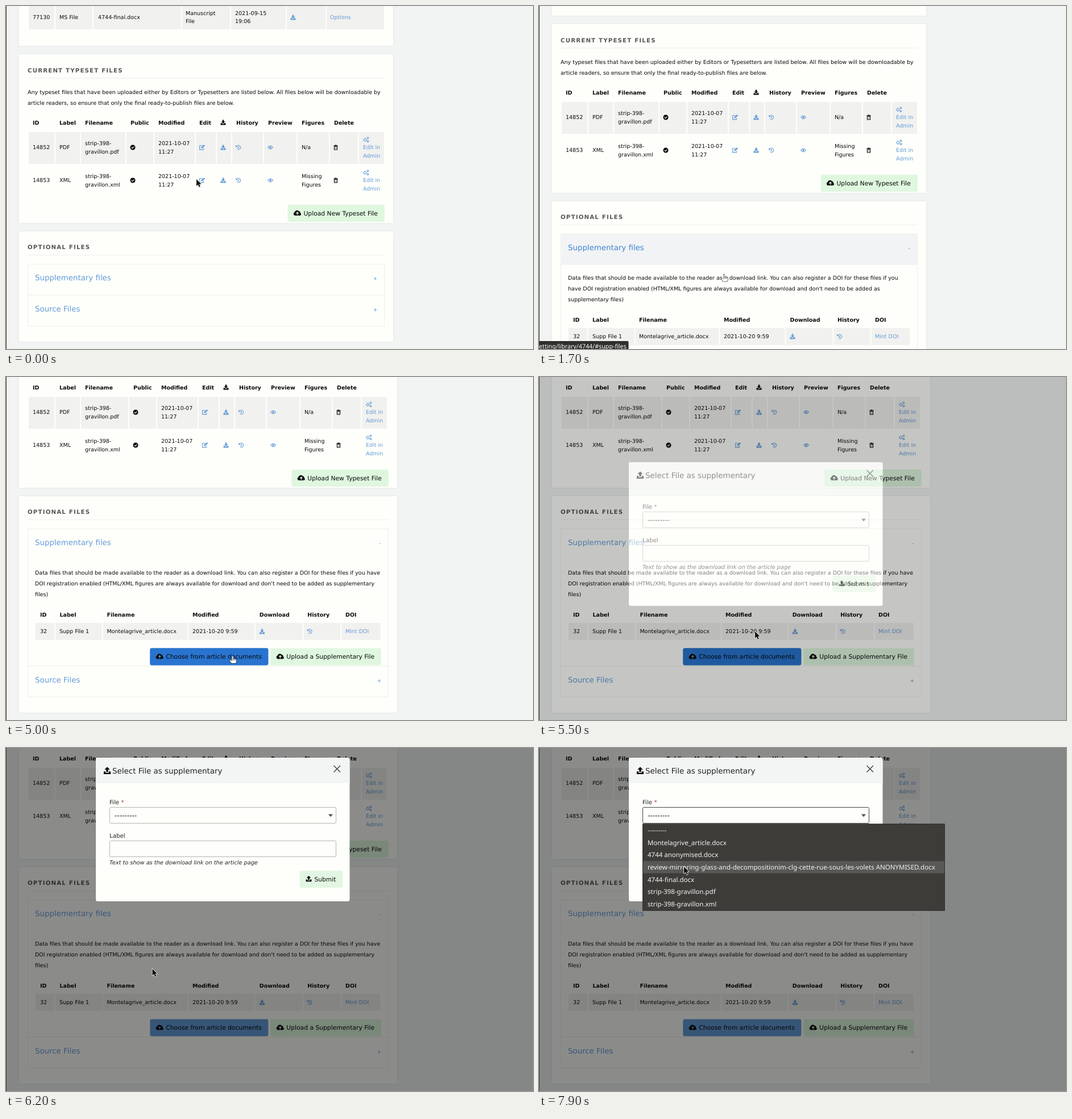
These frames come from a looping animation (927 px wide and 604 px high, 8 s). An HTML page with a canvas:

```html
<!DOCTYPE html>
<html lang="en">
<head>
<meta charset="utf-8">
<title>Typeset files</title>
<style>
html, body { margin: 0; width: 100%; height: 100%; overflow: hidden; background: #f2f4f4; }
canvas { display: block; }
</style>
</head>
<body>
<canvas id="stage" width="927" height="604"></canvas>
<script>
const stage = document.getElementById('stage'), layer = stage.cloneNode();
const LINK = '#649bd8', INK = '#0a0a0a', PAPER = '#fefffb', CELL = '#f1f1ef', MINT = '#dff7df', RULE = '#eeeeeb';
const SANS = '"DejaVu Sans", sans-serif', MENU = '"Noto Sans", sans-serif';
let ctx = stage.getContext('2d'), t = 0, wide = false;

const ramp = (a, b) => Math.min(1, Math.max(0, (t - a) / (b - a)));
const swing = (a, b) => 0.5 - Math.cos(Math.PI * ramp(a, b)) / 2;

function rect(x, y, w, h, color, r = 0) {
  ctx.fillStyle = color;
  ctx.beginPath();
  ctx.roundRect(x, y, w, h, r);
  ctx.fill();
}
function frame(x, y, w, h, color, r = 0) {
  ctx.strokeStyle = color;
  ctx.lineWidth = 1;
  ctx.beginPath();
  ctx.roundRect(x + .5, y + .5, w - 1, h - 1, r);
  ctx.stroke();
}
// y is the middle of the capitals
function text(str, x, y, { size = 9.5, color = INK, style = '', family = SANS, spacing = 0 } = {}) {
  ctx.textRendering = 'geometricPrecision';
  ctx.font = `${style} ${size}px ${family}`;
  ctx.letterSpacing = spacing + 'px';
  ctx.fillStyle = color;
  ctx.fillText(str, x, y + size * .36);
}
const bold = (str, x, y) => text(str, x, y, { style: 'bold' });
const link = (str, x, y) => text(str, x, y, { color: LINK });

// fill, stroke, cut-out stroke
const ICONS = {
  download: ['M-1.3-4.5h2.6v3h2.2L0 2-3.5-1.5h2.2zM-4.5 1.2H-2l2 2 2-2h2.5v3.2h-9z'],
  upload: ['M0-5 3.5-1.5H1.3v3H-1.3v-3H-3.5zM-4.5 1h2.3v1.6h4.4V1h2.3v3.4h-9z'],
  edit: ['M-2 1.6l.4-2.2L3.4-4.7 5.2-2.9.2 1.3z', 'M2.4 1v2.9h-6.8v-7.2H1'],
  history: ['M-4.8-4.2v3.4h3.4z', 'M-3.4-1.6A3.7 3.7 0 1 1-2.6 2.7M.2-2V.6H-1.6'],
  eye: ['M1.7 0A1.7 1.7 0 1 1-1.7 0 1.7 1.7 0 1 1 1.7 0z', 'M-4.5 0Q0-5.6 4.5 0 0 5.6-4.5 0z'],
  check: ['M4.5 0A4.5 4.5 0 1 1-4.5 0 4.5 4.5 0 1 1 4.5 0z', '', 'M-2.2 0-.6 1.7 2.4-1.4'],
  trash: ['M-3.8-3.6h2.2l.5-1h2.2l.5 1h2.2v1h-7.6zM-3.1-2.2h6.2v6.6h-6.2z', '', 'M-1.4-1.2v4.6M0-1.2v4.6M1.4-1.2v4.6'],
  cogs: ['', 'M.3.6A2.3 2.3 0 1 1-4.3.6 2.3 2.3 0 1 1 .3.6M-2-2.6v1M-2 2.8v1M-5.2.6h1M.2.6h1M4.3-2.7A1.3 1.3 0 1 1 1.7-2.7 1.3 1.3 0 1 1 4.3-2.7M4.3 3.2A1.3 1.3 0 1 1 1.7 3.2 1.3 1.3 0 1 1 4.3 3.2'],
  cloud: ['M-3.3 4a2.7 2.7 0 0 1-.8-5.2A3.6 3.6 0 0 1 2.3-2.6 2.6 2.6 0 0 1 4.6.2 2 2 0 0 1 3.8 4z', '', 'M0 3V-1M-1.9.8 0-1.1 1.9.8']
};
function icon(name, x, y, color = LINK, cut = PAPER, scale = 1) {
  const [fill, stroke, hole] = ICONS[name];
  ctx.save();
  ctx.translate(x, y);
  ctx.scale(scale, scale);
  ctx.fillStyle = ctx.strokeStyle = color;
  ctx.lineWidth = 1.1;
  ctx.fill(new Path2D(fill));
  if (stroke) ctx.stroke(new Path2D(stroke));
  if (hole) {
    ctx.strokeStyle = cut;
    ctx.stroke(new Path2D(hole));
  }
  ctx.restore();
}

function cells(edges, y, h) {
  for (let i = 1; i < edges.length; i++)
    rect(edges[i - 1] + 1, y, edges[i] - edges[i - 1] - 2, h, CELL);
}
function card(y, h) {
  ctx.shadowColor = 'rgba(0,0,0,.06)';
  ctx.shadowBlur = 4;
  rect(23, y, wide ? 665 : 658, h, PAPER);
  ctx.shadowColor = 'transparent';
}
function heading(str, y) {
  text(str, 38, y, { size: 10.2, style: 'bold', color: '#555', spacing: 1.2 });
  rect(38, y + 13.5, wide ? 635 : 628, 1, RULE);
}
function button(label, x, y, w, color, hoverColor, hover) {
  rect(x, y, w, 30, color, 3);
  ctx.globalAlpha = hover;
  rect(x, y, w, 30, hoverColor, 3);
  ctx.globalAlpha = 1;
  icon('cloud', x + 17, y + 14.5, INK, color, 1.15);
  text(label, x + 28, y + 15, { size: 10.75 });
}

function manuscriptRow() {
  card(-40, 110);
  cells([39, 86, 153, 309, 395, 493, 563, 666], -10, 51);
  text('77130', 47, 20);
  text('MS File', 94, 20);
  text('4744-final.docx', 162, 20);
  text('Manuscript', 316, 12.5);
  text('File', 316, 27);
  text('2021-09-15', 403, 12.5);
  text('19:06', 403, 27);
  icon('download', 505, 20);
  link('Options', 570, 20);
}

function typesetFiles() {
  const shift = x => x + (wide && x > 132 ? 5 : 0);
  card(85, 297);
  heading('CURRENT TYPESET FILES', 113);
  text('Any typeset files that have been uploaded either by Editors or Typesetters are listed below. All files below will be downloadable by', 38, 151.5);
  text('article readers, so ensure that only the final ready-to-publish files are below.', 38, 170.5);
  const heads = { ID: 47, Label: 94, Filename: 139, Public: 219, Modified: 268, Edit: 340, History: 405, Preview: 461, Figures: 520, Delete: 577 };
  for (const name in heads) bold(name, wide && name === 'Filename' ? 139 : shift(heads[name]), 205.5);
  icon('download', shift(382), 205, INK);
  cells([39, 86, 131, 211, 260, 333, 370, 397, 453, 512, 569, 620, 666].map(shift), 222, 56);
  [['14852', 'PDF', ['N/a']], ['14853', 'XML', ['Missing', 'Figures']]].forEach(([id, kind, figures], i) => {
    const y = 249 + 58 * i;
    text(id, 47, y);
    text(kind, 94, y);
    text('strip-398-', 139, y - 7);
    text('gravillon.' + kind.toLowerCase(), 139, y + 7.5);
    text('2021-10-07', shift(268), y - 7);
    text('11:27', shift(268), y + 7.5);
    icon('check', shift(223), y, INK);
    icon('edit', shift(345), y);
    icon('download', shift(382), y);
    icon('history', shift(409), y);
    icon('eye', shift(465), y);
    figures.forEach((line, n) => text(line, shift(520), y + (figures[1] ? -7 + 14.5 * n : 0)));
    icon('trash', shift(580), y, INK);
    icon('cogs', shift(633.5), y - 14);
    link('Edit in', shift(628), y);
    link('Admin', shift(628), y + 14.5);
  });
  button('Upload New Typeset File', wide ? 502.3 : 495.5, 350, 170.5, MINT, MINT, 0);
}

function supplementary(open) {
  const spread = x => wide ? x + (x - 52) * .0112 : x;
  const lines = wide
    ? ['Data files that should be made available to the reader as a download link. You can also register a DOI for these files if you have',
       "DOI registration enabled (HTML/XML figures are always available for download and don't need to be added as supplementary", 'files)']
    : ['Data files that should be made available to the reader as a download link. You can also register a DOI for these files if you',
       "have DOI registration enabled (HTML/XML figures are always available for download and don't need to be added as", 'supplementary files)'];
  const gap = wide ? 6.3 : 0;
  ctx.save();
  ctx.beginPath();
  ctx.rect(38, 509, 640, open);
  ctx.clip();
  lines.forEach((line, i) => text(line, 51, 531.5 + 19.2 * i));
  const heads = { ID: 60, Label: 94, Filename: 176, Modified: 325, Download: 441.5, History: 525, DOI: 591 };
  for (const name in heads) bold(name, spread(heads[name]), 605.5);
  cells([51, 85.5, 168.5, 317.5, 433.5, 517.5, 583.5, 653].map(spread), 620, 30);
  text('32', 60, 635);
  text('Supp File 1', 94, 635);
  text('Montelagrive_article.docx', spread(176), 635);
  text('2021-10-20 9:59', spread(325), 635);
  icon('download', spread(446), 635);
  icon('history', spread(529), 635);
  link('Mint DOI', spread(591), 635);
  const chosen = ramp(2500, 2900) - ramp(3400, 3700) + ramp(3700, 4000) - ramp(5700, 6100);
  button('Choose from article documents', 247 + gap, 664.5, 208, LINK, '#2874cf', chosen);
  button('Upload a Supplementary File', 459 + gap, 664.5, 194.5, MINT, '#b5e5b5', ramp(3400, 3700) - ramp(3700, 4000));
  ctx.restore();
}

function optionalFiles() {
  const open = 187 * swing(1100, 1400), w = wide ? 635 : 628, right = wide ? 7 : 0;
  const hot = t >= 800 && !wide, accent = hot ? '#3f86d3' : LINK;
  card(397, 194 + open);
  heading('OPTIONAL FILES', 424.5);
  if (hot) rect(38, 454, w, 55, '#f2f3f4');
  frame(38, 454, w, 110 + open, RULE);
  text('Supplementary files', 51, 478, { size: 13.35, color: accent });
  text(open ? '-' : '+', (open ? 649.5 : 645.5) + right, 480, { color: accent });
  if (open) supplementary(open);
  rect(38, 508.5 + open, w, 1, RULE);
  text('Source Files', 51, 533.5 + open, { size: 13.35, color: LINK });
  text('+', 645.5 + right, 535 + open, { color: LINK });
}

function dialog() {
  rect(158, 0, 446.5, 253, PAPER, 3);
  rect(158, 0, 446.5, 45, '#f3f4f4', [3, 3, 0, 0]);
  icon('upload', 178, 23, INK, PAPER, 1.35);
  text('Select File as supplementary', 187, 23, { size: 13.45, color: '#222' });
  ctx.strokeStyle = '#444';
  ctx.lineWidth = 1.5;
  ctx.stroke(new Path2D('M576.5 14l11.5 11.5M588 14l-11.5 11.5'));
  text('File', 182, 78, { size: 10.2, color: '#222' });
  text('*', 202.5, 78, { size: 10.2, color: '#b03020' });
  frame(182, 87, 399, 29, t >= 6500 ? '#444' : '#b4b4b2', 2);
  text('---------', 191, 102, { size: 12 });
  ctx.fillStyle = '#555';
  ctx.fill(new Path2D('M567 99.5h8l-4 5z'));
  text('Label', 182, 137, { size: 10.2, color: '#222' });
  frame(182, 146, 399, 29, '#b4b4b2', 2);
  text('Text to show as the download link on the article page', 182, 184, { size: 9.75, style: 'italic', color: '#222' });
  rect(516.5, 199, 76, 30, '#e3f6e3', 3);
  icon('upload', 532.5, 213.5, INK, PAPER, 1.1);
  text('Submit', 542.5, 214, { size: 10.7 });
}

// the backdrop and the dialog fade in together as one layer
function modal() {
  const shown = swing(4980, 6030), page = ctx;
  ctx = layer.getContext('2d');
  ctx.clearRect(0, 0, 927, 604);
  rect(0, 0, 927, 604, 'rgba(0,0,0,.45)');
  ctx.save();
  ctx.translate(0, Math.round(17 + 262 * (1 - shown)));
  dialog();
  ctx.restore();
  ctx = page;
  ctx.globalAlpha = shown;
  ctx.drawImage(layer, 0, 0);
  ctx.globalAlpha = 1;
}

function menu(pointerY) {
  const items = ['---------', 'Montelagrive_article.docx', '4744 anonymised.docx',
    'review-mirroring-glass-and-decompositionim-clg-cette-rue-sous-les-volets ANONYMISED.docx',
    '4744-final.docx', 'strip-398-gravillon.pdf', 'strip-398-gravillon.xml'];
  rect(182, 133.5, 532, 153, '#3d3c39');
  frame(182, 133.5, 532, 153, '#2c2b29');
  const active = Math.floor((pointerY + 1 - 134.4) / 21.6);
  items.forEach((item, i) => {
    const y = 145 + 21.6 * i;
    if (i === active) rect(183, y - 10.8, 530, 21.6, '#585856');
    text(item, 191, y, { size: 11.5, family: MENU, color: '#f4f4f2' });
  });
}

function statusBubble() {
  if (t < 800 || t >= 2400) return;
  ctx.globalAlpha = 1 - ramp(2100, 2400);
  rect(-2, 590, 159.5, 16, '#2f2f2e', 2);
  text('etting/library/4744/#supp-files', 0, 599, { size: 10.7, family: MENU, color: '#fff' });
  ctx.globalAlpha = 1;
}

const ARROW = new Path2D('M0 0V12L2.8 9.5 4.8 14 6.8 13.1 4.9 8.8H8.6Z');
const HAND = new Path2D('M-1 1Q0-.6 1 1V5Q2.5 4.4 3 5.3 4.4 4.8 5 6 6.5 5.6 6.6 7V10L5.5 13H-1.5L-5 8.5Q-4.8 7-3.2 7.6L-1 9Z');
const BEAM = new Path2D('M-2.5-5.5Q0-5.5 0-4 0-5.5 2.5-5.5M0-4V4M-2.5 5.5Q0 5.5 0 4 0 5.5 2.5 5.5');
// time, x, y
const TRACK = [
  [0, 335, 305], [400, 339, 422], [500, 339, 422], [800, 331, 458], [1000, 325.5, 472], [1900, 325.5, 472],
  [2000, 406, 494], [2500, 406, 494], [2900, 326.5, 487], [3400, 326.5, 487], [3700, 560, 497], [4000, 400, 494],
  [4900, 400, 494], [5300, 394, 482], [5500, 380, 448], [5700, 252.5, 242], [5900, 256, 478], [6100, 256, 478],
  [6500, 262, 121], [6600, 262, 121], [6800, 251, 191], [7000, 255, 209], [7400, 258, 228], [7500, 258, 228],
  [7900, 255, 209], [8000, 255, 209]
];
function pointer() {
  const i = TRACK.findIndex(k => k[0] > t);
  const [t0, x0, y0] = TRACK[i - 1], [t1, x1, y1] = TRACK[i];
  const p = (t - t0) / (t1 - t0);
  return [x0 + (x1 - x0) * p, y0 + (y1 - y0) * p];
}
function drawPointer(x, y) {
  ctx.save();
  ctx.translate(x, y);
  ctx.lineJoin = 'round';
  if (t >= 5600 && t < 5800) {
    ctx.strokeStyle = '#222';
    ctx.lineWidth = 1.2;
    ctx.stroke(BEAM);
  } else {
    const hand = t >= 800 && t < 5300;
    ctx.lineWidth = hand ? 1.1 : 1.4;
    ctx.strokeStyle = hand ? '#111' : '#fff';
    ctx.fillStyle = hand ? '#fff' : '#111';
    const shape = hand ? HAND : ARROW;
    ctx.stroke(shape);
    ctx.fill(shape);
    if (hand) {
      ctx.lineWidth = .7;
      ctx.stroke(new Path2D('M1 5V8M3 5.5V8M5 6V8.3'));
    }
  }
  ctx.restore();
}

function draw(now) {
  t = Math.floor(now % 8000 / 100) * 100;
  wide = t >= 4900;
  rect(0, 0, 927, 604, '#f2f4f4');
  ctx.save();
  ctx.translate(0, -Math.round(187 * ramp(1500, 1800) ** 3.1));
  manuscriptRow();
  typesetFiles();
  optionalFiles();
  ctx.restore();
  if (wide) modal();
  const [x, y] = pointer();
  if (t >= 6600) menu(y);
  rect(0, 0, 1, 604, '#3a3a3c');
  statusBubble();
  drawPointer(x, y);
}
function loop() {
  draw(performance.now());
  requestAnimationFrame(loop);
}
loop();
</script>
</body>
</html>
```
